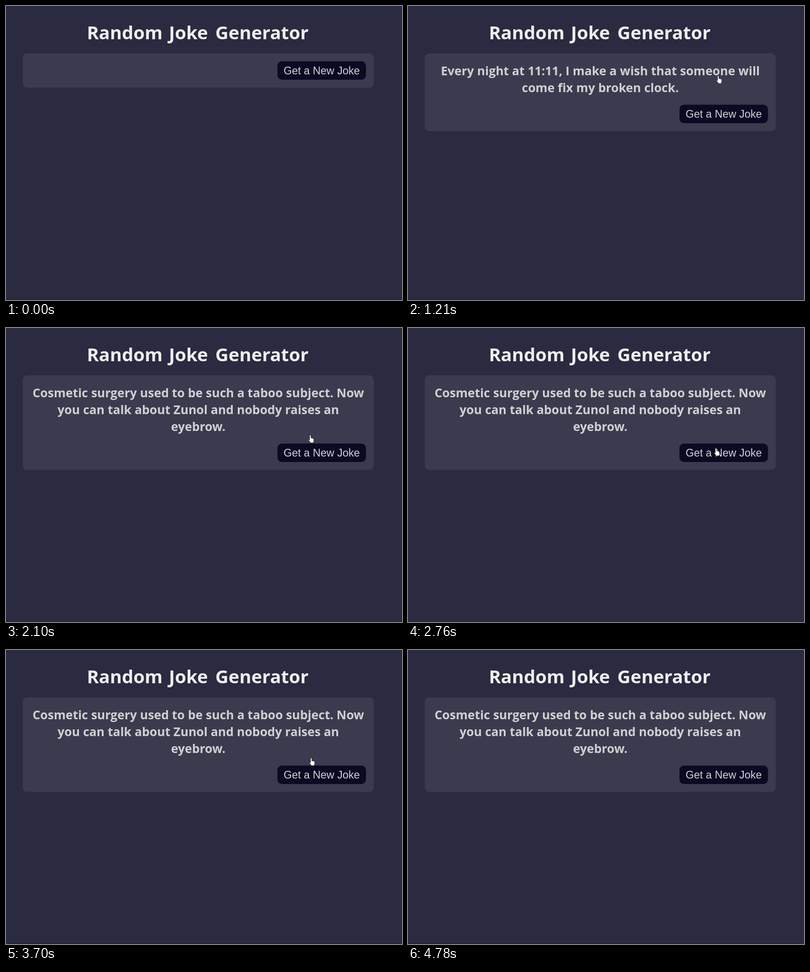
These frames come from a looping animation (868 px wide and 645 px high, 5040 ms). An HTML page:

```html
<!DOCTYPE html>
<html lang="en">
<head>
<meta charset="utf-8">
<title>Random Joke Generator</title>
<style>
  html, body { margin: 0; width: 100%; height: 100%; overflow: hidden; background: #2a2a40; }
  svg { display: block; }
  text { font-family: "Open Sans", "Noto Sans", sans-serif; font-weight: 700; text-anchor: middle; }
  #title { font-size: 40px; fill: #eee; }
  #joke text { font-size: 26.55px; fill: #d0d0d2; }
  #button text { font: 23.5px "Liberation Sans", Arial, sans-serif; fill: #d0d0d5; }
  #cursor path { fill: #fff; stroke: #111; stroke-width: .8; }
</style>
</head>
<body>
<svg width="868" height="645">
  <rect width="868" height="645" fill="#2a2a40"/>
  <rect y="644" width="868" height="1" fill="#1b1b32"/>
  <text id="title" y="73"><tspan x="265.5">Random</tspan> <tspan x="405">Joke</tspan> <tspan x="561">Generator</tspan></text>
  <rect id="panel" x="36.7" y="103.8" width="769.6" rx="10" fill="#3b3b4f"/>
  <g id="joke"></g>
  <g id="button">
    <rect x="595" y="121.3" width="194" height="40.5" rx="10" fill="#0a0a23"/>
    <text x="692" y="149.8">Get a New Joke</text>
  </g>
  <g id="cursor">
    <path id="arrow" d="M0 0V12L2.8 9.6 4.6 13.6 6.6 12.7 4.9 9H8.5Z"/>
    <path id="hand" d="M-1.5 1.5a1.5 1.5 0 0 1 3 0V6.5q1.5-1 2.3.4q1.6-.6 2.1.6q1.9-.4 1.9 1.4V12q0 2-1 3.5V17H0V16Q-2 13.5-4 10.5Q-4.5 9-3 9.2L-1.5 11Z"/>
  </g>
</svg>
<script>
const LOOP = 5040, TICK = 66, LINE = 37.2, GAP = 20.7;
const $ = id => document.getElementById(id);

const surgery = [
  'Cosmetic surgery used to be such a taboo subject. Now',
  'you can talk about Zunol and nobody raises an',
  'eyebrow.'
];
const jokes = [
  { start: 0, lines: [] },
  { start: 1210, lines: ['Every night at 11:11, I make a wish that someone will', 'come fix my broken clock.'] },
  { start: 2100, lines: surgery },
  { start: 3030, lines: ['Q: What did the spaghetti say to the other spaghetti? A:', 'Pasta la vista, baby!'] },
  { start: 3700, lines: surgery }
];

// Pointer path: each move runs from the end of the one before to x, y
const moves = [];
let last = { x: 861, y: 740 };
function move(start, end, x, y, shape = 'hand') {
  moves.push({ start, end, x, y, shape, from: last });
  last = { x, y };
}
move(130, 610, 684, 171, 'arrow');
move(680, 950, 680, 153);
move(1410, 1620, 667, 228);
move(1820, 1900, 660, 225);
move(2100, 2100, 667, 235);
move(2170, 2620, 679, 265);
move(2760, 2830, 671, 263);
move(3030, 3030, 677, 275, 'arrow');
move(3100, 3500, 669, 235);
move(3700, 3900, 669, 242);
move(4030, 4170, 707, 317, 'arrow');
move(4240, 4650, 846, 641, 'arrow');

const current = (list, t) => list.findLast(item => item.start <= t);
const mix = (a, b, p) => a + (b - a) * p;

function pointer(t) {
  const { start, end, x, y, shape, from } = current(moves, t);
  const steps = Math.floor((end - start) / TICK) + 1;
  const p = Math.min(steps, Math.floor((t - start) / TICK) + 1) / steps;
  // Upward moves slow down as they near the button
  const rise = y < from.y ? 1 - (1 - p) ** 2 : p;
  return { x: mix(from.x, x, p), y: mix(from.y, y, rise), shape };
}

let shown;
function showJoke(lines) {
  if (lines === shown) return;
  shown = lines;
  $('joke').innerHTML = lines.map((line, i) =>
    `<text x="421.5" y="${151.5 + i * LINE}">${line}</text>`).join('');
  const extra = lines.length ? lines.length * LINE + GAP : 0;
  $('panel').setAttribute('height', 75.5 + extra);
  $('button').setAttribute('transform', `translate(0 ${extra})`);
}

const show = (id, on) => $(id).setAttribute('display', on ? 'inline' : 'none');

function draw(now) {
  const t = now % LOOP;
  showJoke(current(jokes, t).lines);
  const visible = t >= moves[0].start && t < 4780;
  show('cursor', visible);
  if (!visible) return;
  const { x, y, shape } = pointer(t);
  show('hand', shape === 'hand');
  show('arrow', shape === 'arrow');
  $('cursor').setAttribute('transform', `translate(${x} ${y})`);
}

let begin;
function frame(now) {
  begin ??= now;
  draw(now - begin);
  requestAnimationFrame(frame);
}
draw(0);
requestAnimationFrame(frame);
</script>
</body>
</html>
```
